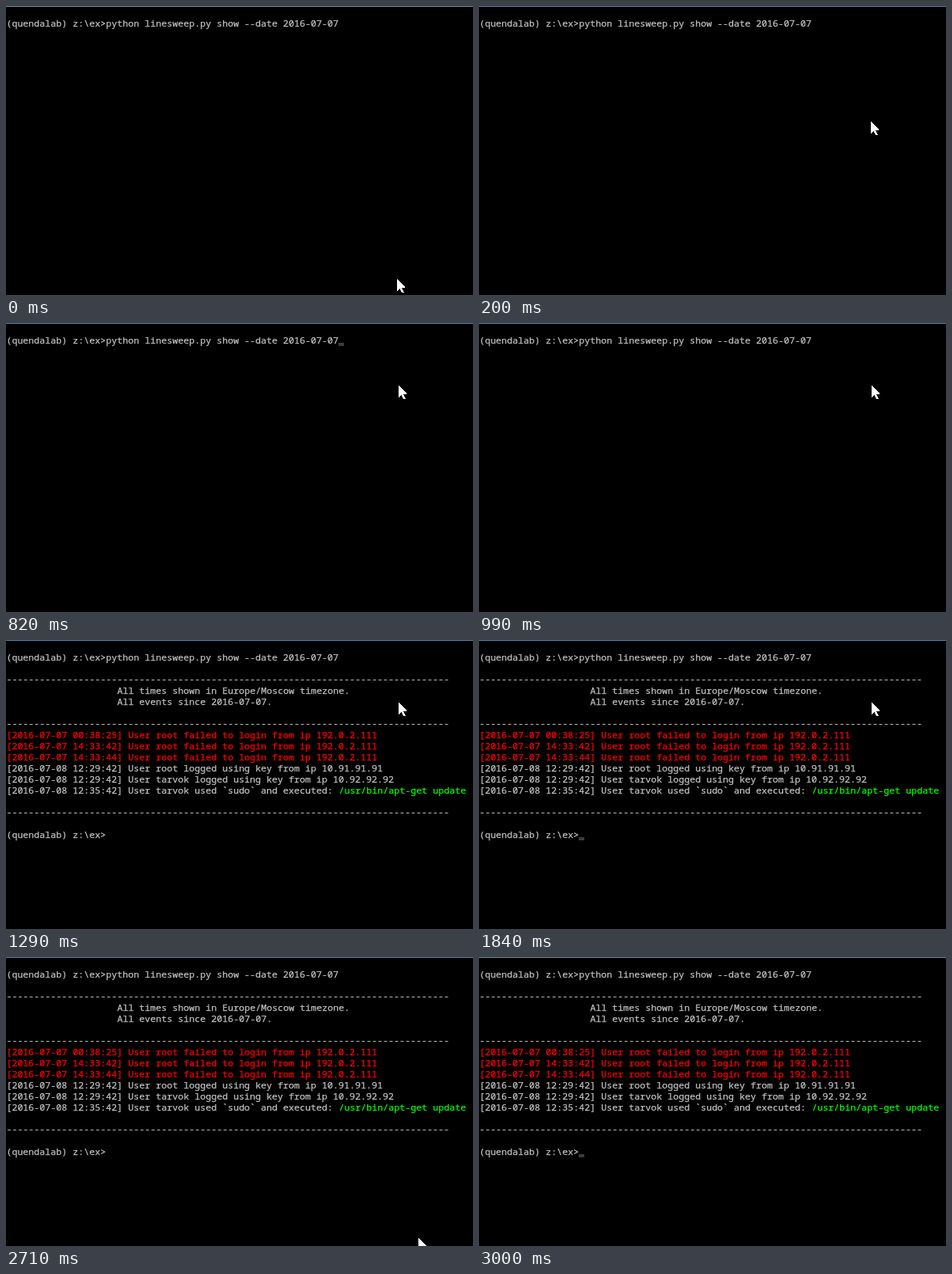
Recreate the animation shown at these times as an HTML page. Size 590 by 365 pixels, loop 3.17 s.

```html
<!DOCTYPE html>
<html lang="en">
<head>
<meta charset="utf-8">
<title>Terminal session</title>
<style>
  html, body { margin: 0; width: 100%; height: 100%; overflow: hidden; background: #000; }
  svg { display: block; }
  text {
    font: 11.6667px "Noto Sans Mono", "DejaVu Sans Mono", monospace;
    white-space: pre;
    color: #c0c0c0;
    fill: currentColor;
    stroke: currentColor;
    stroke-width: .25px;
  }
  .rule { transform: translateY(-.6px); }
  .fail { color: #f00; }
  .command { color: #0f0; }
  .caret { fill: #3c3c3c; }

  /* 3170 ms loop, hard cuts only */
  .edge, .output, .caret, .pointer { animation: 3170ms step-end infinite; }
  .edge { animation-name: edge; }
  .output { animation-name: output; }
  .caret.first { animation-name: blink-first; }
  .caret.second { animation-name: blink-second; }
  .pointer { animation-name: pointer; }

  @keyframes edge {
    0%, 90.22% { fill: #7090a8; }
    2.2% { fill: #5a86b4; }
  }
  @keyframes output {
    0% { visibility: hidden; }
    40.69%, 100% { visibility: visible; }
  }
  @keyframes blink-first {
    0%, 31.23%, 100% { visibility: hidden; }
    25.86% { visibility: visible; }
  }
  @keyframes blink-second {
    0%, 75.39% { visibility: hidden; }
    58.04%, 92.42%, 100% { visibility: visible; }
  }
  @keyframes pointer {
    0% { transform: translate(494px, 345px); visibility: visible; }
    2.2% { transform: translate(494px, 282px); }
    5.36% { transform: translate(495px, 146px); }
    8.51% { transform: translate(496px, 79px); }
    78.23% { transform: translate(499px, 112px); }
    80.75% { transform: translate(508px, 195px); }
    83.28% { transform: translate(516px, 290px); }
    85.48% { transform: translate(521px, 355px); visibility: visible; }
    90.22%, 100% { transform: translate(521px, 355px); visibility: hidden; }
  }
</style>
</head>
<body>
<svg width="590" height="365" viewBox="0 0 590 365">
  <rect width="590" height="365"/>
  <rect class="edge" width="590" height="1"/>
  <g id="prompt"></g>
  <g id="output" class="output"></g>
  <rect class="caret first" x="420" y="25" width="7" height="4"/>
  <rect class="caret second" x="126" y="249" width="7" height="4"/>
  <path class="pointer" fill="#fff" shape-rendering="crispEdges"
    d="M0 0H.5L10 9.5V11H6L8.5 16V17H6L3.5 11.5 0 15Z"/>
</svg>
<script>
  const CELL = 7, LINE = 14, LEFT = .4, BASELINE = 26;
  const prompt = "(quendalab) z:\\ex>";
  const rule = "-".repeat(80);

  function write(group, row, content, column = 0, style = "") {
    const text = document.createElementNS("http://www.w3.org/2000/svg", "text");
    text.setAttribute("x", LEFT + column * CELL);
    text.setAttribute("y", BASELINE + row * LINE);
    text.setAttribute("class", style);
    text.textContent = content;
    document.getElementById(group).append(text);
  }

  write("prompt", 0, prompt + "python linesweep.py show --date 2016-07-07");

  for (const row of [2, 6, 14]) write("output", row, rule, 0, "rule");
  write("output", 3, "All times shown in Europe/Moscow timezone.", 20);
  write("output", 4, "All events since 2016-07-07.", 20);

  ["00:38:25", "14:33:42", "14:33:44"].forEach((time, i) =>
    write("output", 7 + i, `[2016-07-07 ${time}] User root failed to login from ip 192.0.2.111`, 0, "fail"));

  write("output", 10, "[2016-07-08 12:29:42] User root logged using key from ip 10.91.91.91");
  write("output", 11, "[2016-07-08 12:29:42] User tarvok logged using key from ip 10.92.92.92");
  write("output", 12, "[2016-07-08 12:35:42] User tarvok used `sudo` and executed:");
  write("output", 12, "/usr/bin/apt-get update", 60, "command");
  write("output", 16, prompt);
</script>
</body>
</html>
```
